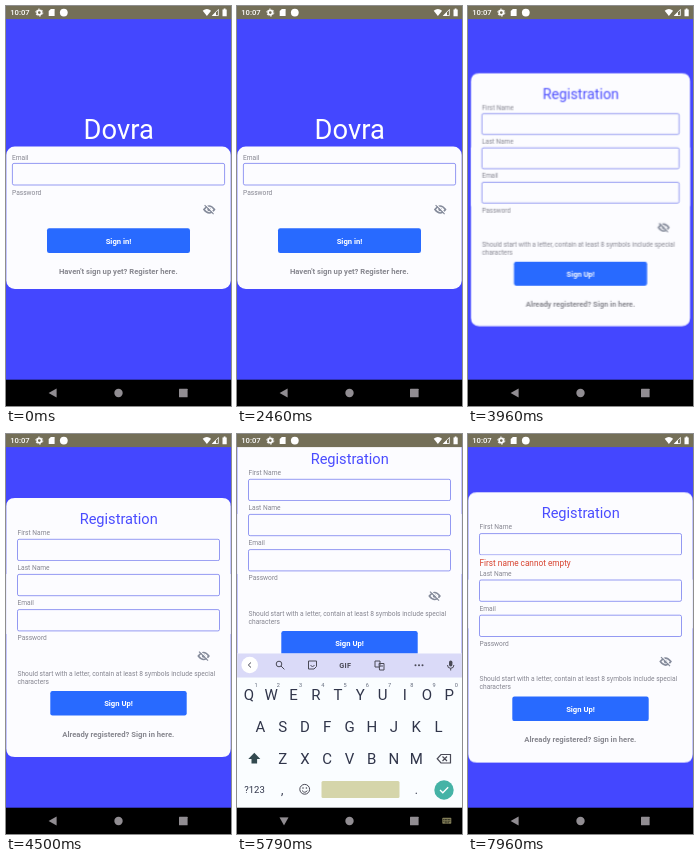
Animation of 225x400 px, one loop 8 s. Source, as an HTML page:

```html
<!DOCTYPE html>
<html lang="en">
<head>
<meta charset="utf-8">
<title>Sign in and registration</title>
<style>
  :root { --blue: #4447ff; --ink: #4a4a56; --loop: 8s; }
  html, body { margin: 0; width: 100%; height: 100%; overflow: hidden; background: #000; }
  svg { display: block; width: 100vw; height: 100vh; }
  text { font-family: Roboto, sans-serif; }
  .page { transform-origin: 112.5px 200px; }
  .bg { fill: var(--blue); }
  .card { fill: #fcfcff; }
  .label { font-size: 6.65px; fill: #868691; }
  .field { fill: #fcfcff; stroke: #7078ee; stroke-width: .75; }
  .button { fill: #286aff; }
  .bold { font-size: 7.66px; font-weight: 700; text-anchor: middle; fill: #87878f; }
  .on { fill: #fff; }
  .title { text-anchor: middle; }
  .error { font-size: 8.25px; fill: #d8432f; }
  .nav { fill: #918d92; }
  .line { fill: none; stroke: var(--ink); stroke-width: 1; }
  .dark { fill: var(--ink); }
  .key { font-size: 15px; text-anchor: middle; fill: #30354a; }
  .digit { font-size: 5.6px; text-anchor: middle; fill: #626a7c; }

  .login, .signup, .upper, .lower, .error, .keys, .back, .ime {
    animation: var(--loop) linear infinite;
  }
  .login { animation-name: leave; }
  .signup { animation-name: enter; }
  .upper { animation-name: upper; }
  .lower { animation-name: lower; }
  .error { animation-name: error; animation-timing-function: step-end; }
  .keys { animation-name: keys; }
  .back { animation-name: back; transform-origin: 47px 387px; }
  .ime { animation-name: ime; animation-timing-function: step-end; }

  @keyframes leave {
    0%, 47.25% { transform: none; }
    48% { transform: scale(1.022); animation-timing-function: ease-out; }
    51%, 100% { transform: scale(1.05); }
  }
  @keyframes enter {
    0%, 47.25% { transform: scale(.85); opacity: 0; }
    48.4% { transform: scale(.94); opacity: 0; animation-timing-function: ease-out; }
    49.2% { opacity: 1; }
    51%, 100% { transform: none; opacity: 1; }
  }
  @keyframes upper {
    0%, 59.4% { transform: none; animation-timing-function: ease-out; }
    62.5%, 92.8% { transform: translateY(-60px); animation-timing-function: ease-out; }
    95.9%, 100% { transform: translateY(-5.7px); }
  }
  @keyframes lower {
    0%, 59.4% { transform: none; animation-timing-function: ease-out; }
    62.5%, 92.79% { transform: translateY(-60px); }
    92.8% { transform: translateY(-48.7px); animation-timing-function: ease-out; }
    95.9%, 100% { transform: translateY(5.6px); }
  }
  @keyframes error {
    0% { opacity: 0; transform: translateY(-54.3px); }
    92.8% { opacity: 1; transform: translateY(-54.3px); animation-timing-function: ease-out; }
    95.9%, 100% { opacity: 1; transform: none; }
  }
  @keyframes keys {
    0%, 59.4% { transform: translateY(160px); animation-timing-function: ease-out; }
    62.5%, 92.8% { transform: none; animation-timing-function: ease-in; }
    95.9%, 100% { transform: translateY(160px); }
  }
  @keyframes back {
    0%, 59.4% { transform: none; }
    61.5%, 92.8% { transform: rotate(-90deg); }
    94.9%, 100% { transform: none; }
  }
  @keyframes ime {
    0% { opacity: 0; }
    60% { opacity: 1; }
    94%, 100% { opacity: 0; }
  }
</style>
</head>
<body>
<svg viewBox="0 0 225 400" preserveAspectRatio="none">
  <defs>
    <g id="eye" fill="none" stroke="#858b9b">
      <path d="M-5.3 0Q0 -7 5.3 0Q0 7 -5.3 0Z" stroke-width="1.6"/>
      <circle r="1.8" fill="#858b9b" stroke="none"/>
      <path d="M-3.8 -5.2L5.2 3.8" stroke="#fcfcff" stroke-width="1.1"/>
      <path d="M-4.6 -4.4L4.4 4.6" stroke-width="1.2"/>
    </g>
  </defs>

  <g class="page login">
    <rect class="bg" x="-20" y="-20" width="265" height="440"/>
    <text class="title on" x="112.7" y="133" font-size="27.35">Dovra</text>
    <rect class="card" x=".3" y="140.5" width="224.4" height="142.5" rx="8.5"/>
    <text class="label" x="6" y="153.6">Email</text>
    <rect class="field" x="6.4" y="157.4" width="212.2" height="21.6" rx="1.6"/>
    <text class="label" x="6" y="188.6">Password</text>
    <use href="#eye" x="203.2" y="203.5"/>
    <rect class="button" x="41" y="222.2" width="143" height="24.8" rx="2.2"/>
    <text class="bold on" x="112.5" y="237.5">Sign in!</text>
    <text class="bold" x="112.3" y="268.2">Haven't sign up yet? Register here.</text>
  </g>

  <g class="page signup">
    <rect class="bg" x="-20" y="-20" width="265" height="440"/>
    <path class="card upper" d="M.3 200V72.5q0 -8.5 8.5 -8.5h207.4q8.5 0 8.5 8.5V200Z"/>
    <path class="card lower" d="M.3 140V314.5q0 8.5 8.5 8.5h207.4q8.5 0 8.5 -8.5V140Z"/>
    <g class="upper">
      <text class="title" x="112.7" y="90.2" font-size="14.6" fill="#4a4cff">Registration</text>
      <text class="label" x="11.5" y="101.2">First Name</text>
      <rect class="field" x="11.5" y="105.3" width="202" height="21.3" rx="1.6"/>
    </g>
    <text class="error" x="11.5" y="132.2">First name cannot empty</text>
    <g class="lower">
      <text class="label" x="11.5" y="136.2">Last Name</text>
      <rect class="field" x="11.5" y="140.4" width="202" height="21.3" rx="1.6"/>
      <text class="label" x="11.5" y="171.3">Email</text>
      <rect class="field" x="11.5" y="175.6" width="202" height="21.3" rx="1.6"/>
      <text class="label" x="11.5" y="206.4">Password</text>
      <use href="#eye" x="197.6" y="222"/>
      <text class="label" x="11.5" y="241.8">Should start with a letter, contain at least 8 symbols include special</text>
      <text class="label" x="11.5" y="249.6">characters</text>
      <rect class="button" x="44.3" y="257" width="136.4" height="24.5" rx="2.2"/>
      <text class="bold on" x="112.5" y="272.2">Sign Up!</text>
      <text class="bold" x="112.3" y="302.8">Already registered? Sign in here.</text>
    </g>
  </g>

  <g class="keys">
    <rect y="219.5" width="225" height="155" fill="#fafdff"/>
    <rect y="219.5" width="225" height="24" fill="#dadaf8"/>
    <circle cx="12.7" cy="231" r="8.3" fill="#fff"/>
    <path class="line" d="M14 228.5l-2.7 2.5l2.7 2.5"/>
    <g class="line">
      <circle cx="42" cy="230" r="2.8"/>
      <path d="M44 232l3.4 3.4"/>
      <path d="M71.5 227h8v5.5l-2.5 2.5h-5.5ZM73.5 231.5q2 2 4 0"/>
      <path d="M138 227h5v6h-5ZM142 229.5h5v6.5h-4.5ZM143.5 232h2.5"/>
    </g>
    <text class="dark" x="108.3" y="233.7" font-size="7.3" font-weight="700" letter-spacing=".4" text-anchor="middle">GIF</text>
    <g class="dark">
      <circle cx="178.5" cy="231.3" r="1"/><circle cx="182" cy="231.3" r="1"/><circle cx="185.5" cy="231.3" r="1"/>
      <rect x="212" y="226.5" width="3.4" height="6" rx="1.7"/>
    </g>
    <path class="line" d="M210.5 231q0 3.3 3.2 3.3t3.2 -3.3M213.7 234.3v2.2"/>
    <g id="letters"></g>
    <path d="M17.3 318.8l-6 6.2h3.2v4.5h5.6v-4.5h3.2Z" fill="#334a50"/>
    <path class="line" d="M204 320.5h9.5v8.5h-9.5l-3.8 -4.25ZM205.5 322.5l4.5 4.5m0 -4.5l-4.5 4.5" style="stroke-width:1.2"/>
    <text class="key" x="17.5" y="359.3" style="font-size:9.5px">?123</text>
    <text class="key" x="45.3" y="359.5" style="font-size:12px">,</text>
    <text class="key" x="179.3" y="359.5" style="font-size:12px">.</text>
    <g class="line"><circle cx="67.7" cy="355.3" r="4.9"/><path d="M65 356.5q2.7 3.5 5.4 0"/></g>
    <g class="dark"><circle cx="66" cy="354" r=".8"/><circle cx="69.4" cy="354" r=".8"/></g>
    <rect x="84.5" y="347" width="78" height="17" rx="1.5" fill="#d5d5aa"/>
    <circle cx="207" cy="356" r="9.7" fill="#45b3a6"/>
    <path d="M203 356l2.8 2.8l5.4 -5.6" fill="none" stroke="#fff" stroke-width="1.3"/>
  </g>

  <rect width="225" height="13.1" fill="#746f58"/>
  <g fill="#fff">
    <text x="4.2" y="9.4" font-size="7.66" font-weight="500">10:07</text>
    <circle cx="33.3" cy="6.6" r="2.2" fill="none" stroke="#fff" stroke-width="1.7"/>
    <circle cx="33.3" cy="6.6" r="3.5" fill="none" stroke="#fff" stroke-width="1" stroke-dasharray="1.83"/>
    <path d="M42.7 5l2.2 -2.1h3.7v7.2h-5.9Z"/>
    <circle cx="57.8" cy="6.6" r="3.9"/>
    <path d="M196.7 4.7q4.2 -3.4 8.4 0l-4.2 5.2Z"/>
    <path d="M206.4 9.5l6 -6v6Z" fill="none" stroke="#fff" stroke-width=".8"/>
    <path d="M206 10l4 -4v4Z"/>
    <path d="M216.5 3.5h1.2v-.9h1.8v.9h1.2v6.8h-4.2Z"/>
  </g>

  <rect y="373.7" width="225" height="26.3"/>
  <g class="nav">
    <path class="back" d="M42.6 387l8 -4.6v9.2Z"/>
    <circle cx="112.5" cy="387" r="4.2"/>
    <rect x="173" y="382.7" width="8.6" height="8.6" rx=".5"/>
    <g class="ime" fill="#827e58">
      <rect x="205.3" y="383.8" width="9" height="6" rx=".7"/>
      <path d="M206.3 385.5h7M206.3 387.2h7M207.8 388.8h4" stroke="#000" stroke-width=".7" stroke-dasharray="1 .5"/>
    </g>
  </g>
</svg>
<script>
  const letters = document.getElementById('letters');
  const pitch = 22.25;

  function put(cls, x, y, label) {
    const t = document.createElementNS('http://www.w3.org/2000/svg', 'text');
    t.setAttribute('class', cls);
    t.setAttribute('x', x);
    t.setAttribute('y', y);
    t.textContent = label;
    letters.append(t);
  }

  const rows = [['QWERTYUIOP', 12, 265.5], ['ASDFGHJKL', 23.5, 298], ['ZXCVBNM', 45.7, 330]];
  for (const [row, x, y] of rows) {
    [...row].forEach((c, i) => put('key', x + i * pitch, y, c));
  }
  for (let i = 0; i < 10; i++) put('digit', 19 + i * pitch, 253, (i + 1) % 10);
</script>
</body>
</html>
```
